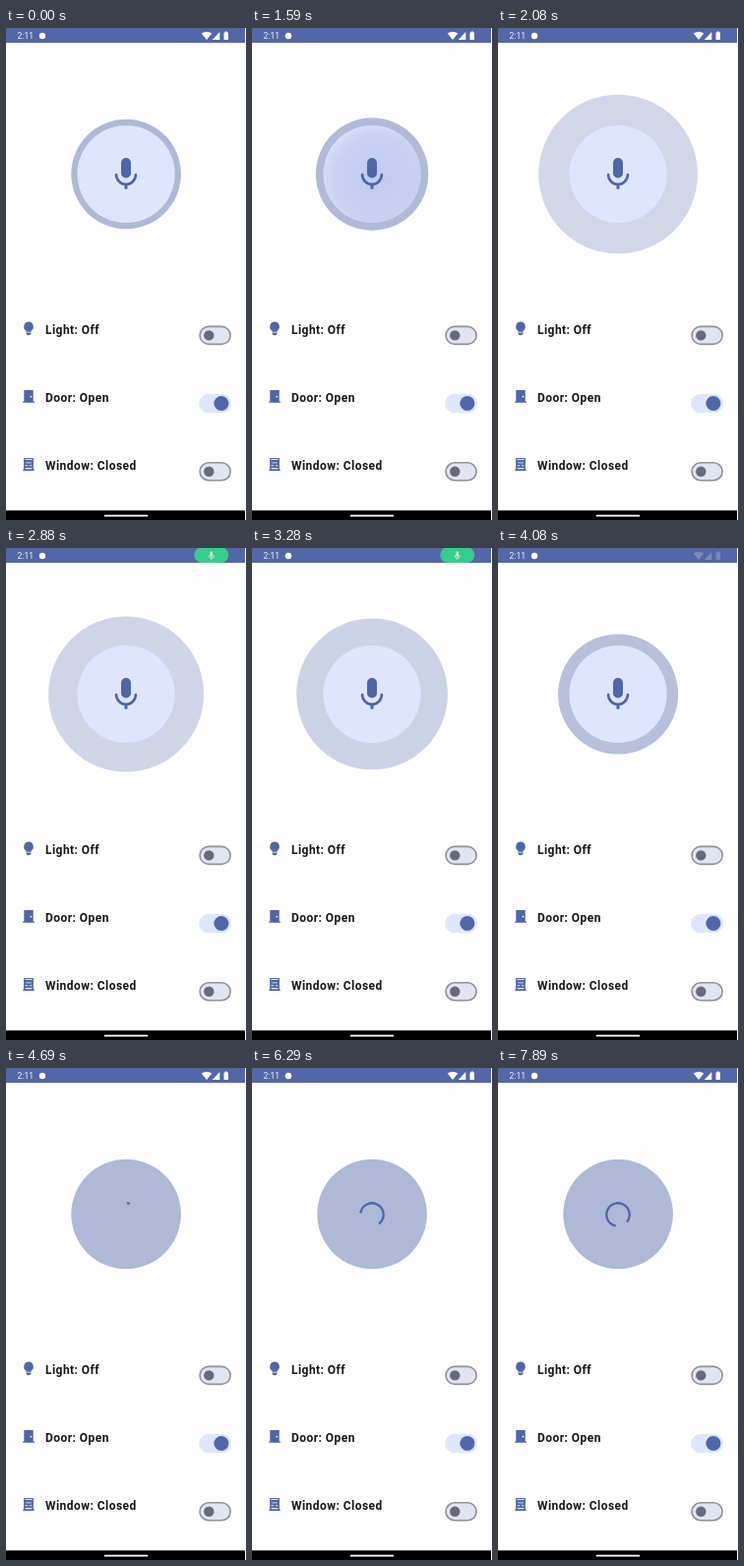
These frames come from a looping animation (244 px wide and 500 px high, 7990 ms). An HTML page:

```html
<!DOCTYPE html>
<html lang="en">
<head>
<meta charset="utf-8">
<title>Home control</title>
<style>
  html, body { margin: 0; width: 100%; height: 100%; overflow: hidden; background: #fefefe; }
  svg { display: block; width: 244px; height: 500px; }
  text { font-family: Roboto, "Noto Sans", sans-serif; }
  .label { font-size: 12px; font-weight: 700; letter-spacing: .45px; fill: #161619; }
</style>
</head>
<body>
<svg viewBox="0 0 244 500">
  <defs>
    <clipPath id="discClip"><circle cx="122.1" cy="148.5" r="49.6"/></clipPath>
    <clipPath id="barClip"><rect width="243" height="15"/></clipPath>
    <radialGradient id="rippleFill">
      <stop offset="0" stop-color="#4f66a8" stop-opacity=".2"/>
      <stop offset=".78" stop-color="#4f66a8" stop-opacity=".16"/>
      <stop offset="1" stop-color="#4f66a8" stop-opacity=".06"/>
    </radialGradient>
    <g id="mic">
      <rect x="-5" y="-17" width="10" height="20.5" rx="5"/>
      <path d="M-9.9 0A9.9 9.9 0 0 0 9.9 0" fill="none" stroke="currentColor" stroke-width="2.6" stroke-linecap="round"/>
      <rect x="-1.6" y="9" width="3.2" height="5.8" rx="1"/>
    </g>
    <g id="switchOff">
      <rect x="-15.5" y="-9" width="31" height="18" rx="9" fill="#e1e4f1" stroke="#8f909b" stroke-width="1.6"/>
      <circle cx="-6.3" r="5.2" fill="#676a7c"/>
    </g>
    <g id="switchOn">
      <rect x="-16.3" y="-9.8" width="32.6" height="19.6" rx="9.8" fill="#dee6ff"/>
      <circle cx="6.3" r="7.5" fill="#4f66a8"/>
    </g>
  </defs>

  <rect width="244" height="500" fill="#fefefe"/>
  <g clip-path="url(#barClip)">
    <rect width="243" height="15" fill="#5267a6"/>
    <text x="11.5" y="11.2" font-size="8.6" fill="#eef0f8">2:11</text>
    <circle cx="37" cy="8" r="3.2" fill="#fff"/>
    <g id="statusIcons" fill="#fff">
      <path d="M198.7 5.6Q204 1.8 209.3 5.6L204 12Z"/>
      <path d="M209.7 12L217.3 4V12Z"/>
      <path d="M221.5 4.6H222.7V3.6H224.8V4.6H226V12H221.5Z"/>
    </g>
    <g id="chip">
      <rect x="-17.5" y="-8" width="35" height="16" rx="8" fill="#36cd8c"/>
      <use href="#mic" transform="translate(0 .6) scale(.26)" fill="#fff" color="#fff"/>
    </g>
  </g>

  <circle id="ring" cx="122.1" cy="148.5" fill="#4f66a8"/>
  <g id="button">
    <circle cx="122.1" cy="148.5" r="49.6" fill="#dee6ff"/>
    <g clip-path="url(#discClip)"><circle id="ripple" fill="url(#rippleFill)"/></g>
    <use href="#mic" x="122" y="149" fill="#4f66a8" color="#4f66a8"/>
  </g>
  <path id="spinner" fill="none" stroke="#4f66a8" stroke-width="2.3" stroke-linecap="square"/>

  <g fill="#4f66a8">
    <path d="M23 298.6A4.9 4.9 0 0 1 25.6 307.6V308.7H20.4V307.6A4.9 4.9 0 0 1 23 298.6Z"/>
    <path d="M20.6 309.6H25.4V310.7Q24.8 312.2 23 312.2T20.6 310.7Z"/>
    <path d="M18.3 368H27.7V379.4H28.9V380.8H17.1V379.4H18.3Z"/>
    <circle cx="25.4" cy="374.6" r=".9" fill="#fff"/>
    <path d="M18.1 437H27.9V448.6H28.6V449.9H17.4V448.6H18.1Z"/>
    <path d="M19.4 438.5H26.6M19.6 444.7H22.2M23.8 444.7H26.4M19.6 447.6H26.4" stroke="#e3e8f8" stroke-width="1.1"/>
    <path d="M20.2 441.8H25.8" stroke="#b9c3e2" stroke-width="1.2"/>
  </g>
  <text class="label" x="40" y="311">Light: Off</text>
  <text class="label" x="40" y="380.2">Door: Open</text>
  <text class="label" x="40" y="449.4">Window: Closed</text>
  <use href="#switchOff" x="212.6" y="312.4"/>
  <use href="#switchOn" x="212.6" y="381.5"/>
  <use href="#switchOff" x="212.6" y="450.8"/>

  <rect y="490.3" width="243" height="9.7"/>
  <rect x="99.7" y="494.8" width="44.6" height="1.7" rx=".85" fill="#fff"/>
</svg>
<script>
const LOOP = 7990;
const PRESS = 1585, PULSE_START = 1520, PULSE = 511, RELEASE = 3930, BUSY = 4470;
const SPIN_START = 4645, SPIN = 1332;
const REST_R = 55.8, PEAK_R = 81;

const el = id => document.getElementById(id);
const [ring, ripple, button, spinner, chip, statusIcons] =
  ["ring", "ripple", "button", "spinner", "chip", "statusIcons"].map(el);
const set = (node, attrs) => {
  for (const name in attrs) node.setAttribute(name, attrs[name]);
};
const progress = (t, from, to) => Math.min(1, Math.max(0, (t - from) / (to - from)));
const mix = (a, b, k) => a + (b - a) * k;

// cubic-bezier(.4, 0, .2, 1), solved by bisection
function ease(x) {
  let low = 0, high = 1;
  for (let i = 0; i < 20; i++) {
    const u = (low + high) / 2, v = 1 - u;
    if (1.2 * v * v * u + .6 * v * u * u + u ** 3 < x) low = u; else high = u;
  }
  return low * low * (3 - 2 * low);
}

function pulse(t) {
  if (t < PRESS) return 0;
  if (t > RELEASE) return pulse(RELEASE) * (1 - ease(progress(t, RELEASE, RELEASE + 300)));
  const phase = (t - PULSE_START) / PULSE % 2;
  return ease(phase < 1 ? phase : 2 - phase);
}

function drawButton(t) {
  const r = mix(REST_R, PEAK_R, pulse(t));
  set(ring, { r, "fill-opacity": .46 - (r - REST_R) * .0081 });
  set(button, { visibility: t < BUSY ? "visible" : "hidden" });
  const spread = ease(progress(t, 1500, 1740));
  set(ripple, {
    cx: mix(136, 122, spread),
    cy: mix(160, 148.5, spread),
    r: mix(50, 62, spread),
    opacity: t < PRESS ? 0 : 1 - progress(t, 1680, 1900)
  });
}

function drawSpinner(t) {
  set(spinner, { visibility: t < BUSY ? "hidden" : "visible" });
  const elapsed = Math.max(0, t - SPIN_START);
  const local = elapsed % SPIN / SPIN;
  const base = Math.floor(elapsed / SPIN) * 216 + local * 286;
  const head = 290 * ease(progress(local, 0, .5));
  const tail = 290 * ease(progress(local, .5, 1));
  const sweep = Math.max(.5, head - tail);
  const point = degrees => {
    const a = degrees * Math.PI / 180;
    return `${122 + 11.7 * Math.sin(a)} ${149 - 11.7 * Math.cos(a)}`;
  };
  const start = base + tail;
  set(spinner, { d: `M${point(start)}A11.7 11.7 0 ${sweep > 180 ? 1 : 0} 1 ${point(start + sweep)}` });
}

function drawStatus(t) {
  set(statusIcons, { opacity: 1 - progress(t, 2240, 2380) + progress(t, 4040, 4220) });
  const shown = ease(progress(t, 2400, 2620)) * (1 - ease(progress(t, 3300, 3600)));
  set(chip, {
    transform: `translate(${mix(232, 208.8, shown)} 7.2) scale(${mix(.3, 1, shown)})`,
    opacity: Math.min(1, shown * 1.5)
  });
}

function draw(t) {
  drawButton(t);
  drawSpinner(t);
  drawStatus(t);
}

const began = performance.now();
function tick() {
  draw((performance.now() - began) % LOOP);
  requestAnimationFrame(tick);
}
draw(0);
requestAnimationFrame(tick);
</script>
</body>
</html>
```
